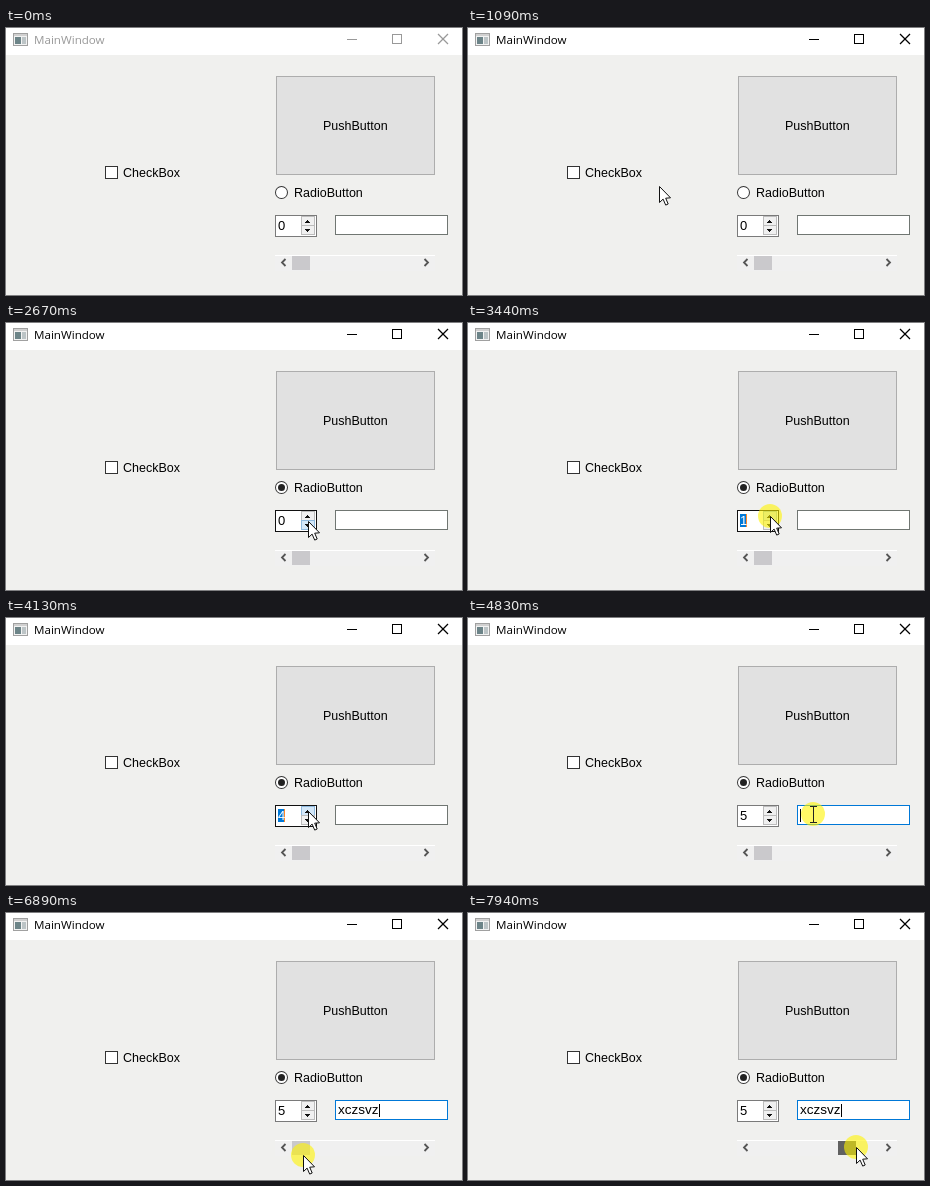
An HTML page with a canvas for the animation above (8000 ms loop, 456 px wide and 267 px high).

```html
<!DOCTYPE html>
<html lang="en">
<head>
<meta charset="utf-8">
<title>MainWindow</title>
<style>
html, body { margin: 0; height: 100%; overflow: hidden; background: #f0f0ee; }
canvas { display: block; }
</style>
</head>
<body>
<canvas id="stage" width="456" height="267"></canvas>
<script>
const ctx = document.getElementById('stage').getContext('2d');
const LOOP = 8000;
const UI = '"Liberation Sans", Arial, sans-serif';
const BLUE = '#0078d7';

// event times in ms
const ENTER = 210, RADIO = 2200, SPIN = 2810, STEP = 3440, EDIT = 4830, MISS = 6750, GRAB = 7520;
const CLICKS = [RADIO, SPIN, EDIT, MISS], CLICK_MS = 150;
const STEP_MS = 190, STEPS = 5, KEY_MS = 86, BLINK_MS = 530;
const WORD = 'xczsvz';

// pointer moves: begin, duration, x, y
const moves = [
  [ENTER, 340, 126, 180],
  [880, 560, 330, 110],
  [1640, 210, 308, 145],
  [1850, 280, 282, 164],
  [2470, 200, 302, 198],
  [3230, 140, 302, 193],
  [4270, 490, 345, 196],
  [5330, 280, 293, 223],
  [5810, 740, 297, 242],
  [7100, 350, 304, 234],
  [7590, 350, 388, 234]
];

const clamp = (v, lo, hi) => Math.min(hi, Math.max(lo, v));
const ticks = (t, begin, every, max) => clamp(Math.floor((t - begin) / every) + 1, 0, max);

function pointerAt(t) {
  return moves.reduce(([x, y], [begin, ms, toX, toY]) => {
    const k = clamp((t - begin) / ms, 0, 1);
    const ease = k * k * (3 - 2 * k);
    return [x + (toX - x) * ease, y + (toY - y) * ease];
  }, [180, 228]).map(Math.round);
}

function isPressed(t) {
  const since = t - STEP;
  const stepping = since >= 0 && since < STEP_MS * STEPS && since % STEP_MS < STEP_MS / 2;
  return stepping || t >= GRAB || CLICKS.some(c => t >= c && t < c + CLICK_MS);
}

function rect(x, y, w, h, fill) {
  ctx.fillStyle = fill;
  ctx.fillRect(x, y, w, h);
}

function box(x, y, w, h, fill, edge) {
  rect(x, y, w, h, edge);
  rect(x + 1, y + 1, w - 2, h - 2, fill);
}

function text(s, x, y, size = 12.5, color = '#000', family = UI) {
  ctx.font = `${size}px ${family}`;
  ctx.fillStyle = color;
  ctx.fillText(s, x, y);
}

function line(points, color, width = 1) {
  ctx.beginPath();
  points.forEach(p => ctx.lineTo(...p));
  ctx.strokeStyle = color;
  ctx.lineWidth = width;
  ctx.stroke();
}

function disc(x, y, r, fill) {
  ctx.beginPath();
  ctx.arc(x, y, r, 0, 7);
  ctx.fillStyle = fill;
  ctx.fill();
}

function titleBar(active) {
  const ink = active ? '#000' : '#999';
  rect(0, 0, 456, 27, '#fff');
  box(7, 5, 15, 13, '#f2f2f2', '#a0a0a0');
  rect(8, 6, 13, 2, '#d0d0d0');
  rect(9, 9, 6, 7, '#6c8488');
  rect(16, 9, 4, 7, '#bcc4c6');
  text('MainWindow', 28, 15.5, 11.6, ink, '"Open Sans", "Noto Sans", sans-serif');
  rect(341, 11, 10, 1, ink);
  box(386, 6, 10, 10, '#fff', ink);
  line([[432, 6], [442, 16]], ink, 1.2);
  line([[442, 6], [432, 16]], ink, 1.2);
}

function spinButton(y, dir, hot) {
  box(295, y, 14, 10, hot ? '#d3e7f8' : '#f0f0f0', hot ? '#8fb9dd' : '#bcbcbc');
  for (let i = 0; i < 3; i++) {
    rect(301 - i, y + 5 + dir * (i - 1), 1 + 2 * i, 1, '#111');
  }
}

function chevron(x, dir) {
  line([[x - 2 * dir, 231], [x + 1.5 * dir, 234.5], [x - 2 * dir, 238]], '#555', 1.8);
}

function arrow(x, y) {
  ctx.beginPath();
  [[0, 0], [0, 16], [3.6, 12.6], [6.2, 18.6], [8.7, 17.5], [6.2, 11.7], [11, 11.3]]
    .forEach(([dx, dy]) => ctx.lineTo(x + .5 + dx, y + .5 + dy));
  ctx.closePath();
  ctx.fillStyle = '#fff';
  ctx.fill();
  ctx.strokeStyle = '#111';
  ctx.lineWidth = 1;
  ctx.stroke();
}

function iBeam(x, y) {
  rect(x, y - 7, 1, 15, '#222');
  rect(x - 3, y - 8, 7, 1, '#222');
  rect(x - 3, y + 8, 7, 1, '#222');
}

function draw(t) {
  const [px, py] = pointerAt(t);
  const over = (x, y, w, h) => px >= x && px < x + w && py >= y && py < y + h;
  const editing = t >= EDIT;

  rect(0, 0, 456, 267, '#f0f0ee');
  titleBar(t >= ENTER);

  const hot = over(270, 48, 159, 99);
  box(270, 48, 159, 99, hot ? '#deecf8' : '#e1e1e1', hot ? BLUE : '#adadad');
  text('PushButton', 317, 102);

  box(99, 138, 13, 13, '#fff', '#333');
  text('CheckBox', 117, 149);

  disc(275.5, 164.5, 6.5, '#333');
  disc(275.5, 164.5, 5.5, '#fff');
  if (t >= RADIO) disc(275.5, 164.5, 3.5, '#222');
  text('RadioButton', 288, 169);

  // spin box
  const spinning = t >= SPIN && !editing;
  const spinEdge = over(269, 187, 42, 22) ? '#111' : spinning ? BLUE : '#7a7a7a';
  box(269, 187, 42, 22, '#fff', spinEdge);
  if (spinning) {
    rect(272, 191, 6, 13, BLUE);
    rect(278, 191, 1, 13, '#ff8728');
  }
  text(ticks(t, STEP, STEP_MS, STEPS), 272, 202, 13, spinning ? '#fff' : '#000');
  spinButton(188, 1, over(295, 187, 14, 11));
  spinButton(197, -1, over(295, 198, 14, 11));

  // line edit
  const inEdit = over(329, 187, 113, 20);
  box(329, 187, 113, 20, '#fff', editing ? BLUE : inEdit ? '#111' : '#707672');
  const typed = ticks(t, EDIT + 2 * KEY_MS, KEY_MS, WORD.length);
  text(WORD.slice(0, typed), 332, 201, 13.5);
  const idle = t - EDIT - (typed && (typed + 1) * KEY_MS);
  if (editing && idle % (2 * BLINK_MS) < BLINK_MS) {
    rect(332 + Math.round(ctx.measureText(WORD.slice(0, typed)).width), 191, 1, 13, '#000');
  }

  // scroll bar
  rect(269, 227, 160, 16, '#f0f0f0');
  rect(269, 227, 160, 1, '#fff');
  chevron(277.5, -1);
  chevron(420.5, 1);
  const drag = t >= GRAB;
  const thumb = drag ? px - 18 : 286;
  rect(thumb, 228, 18, 14, drag ? '#606060' : over(286, 228, 18, 14) ? '#a6a6a6' : '#cac9cc');

  if (t < ENTER) return;
  if (isPressed(t)) disc(px, py, 12, 'rgba(255, 244, 0, .6)');
  (inEdit ? iBeam : arrow)(px, py);
}

function tick() {
  draw(performance.now() % LOOP);
  requestAnimationFrame(tick);
}
tick();
</script>
</body>
</html>
```
